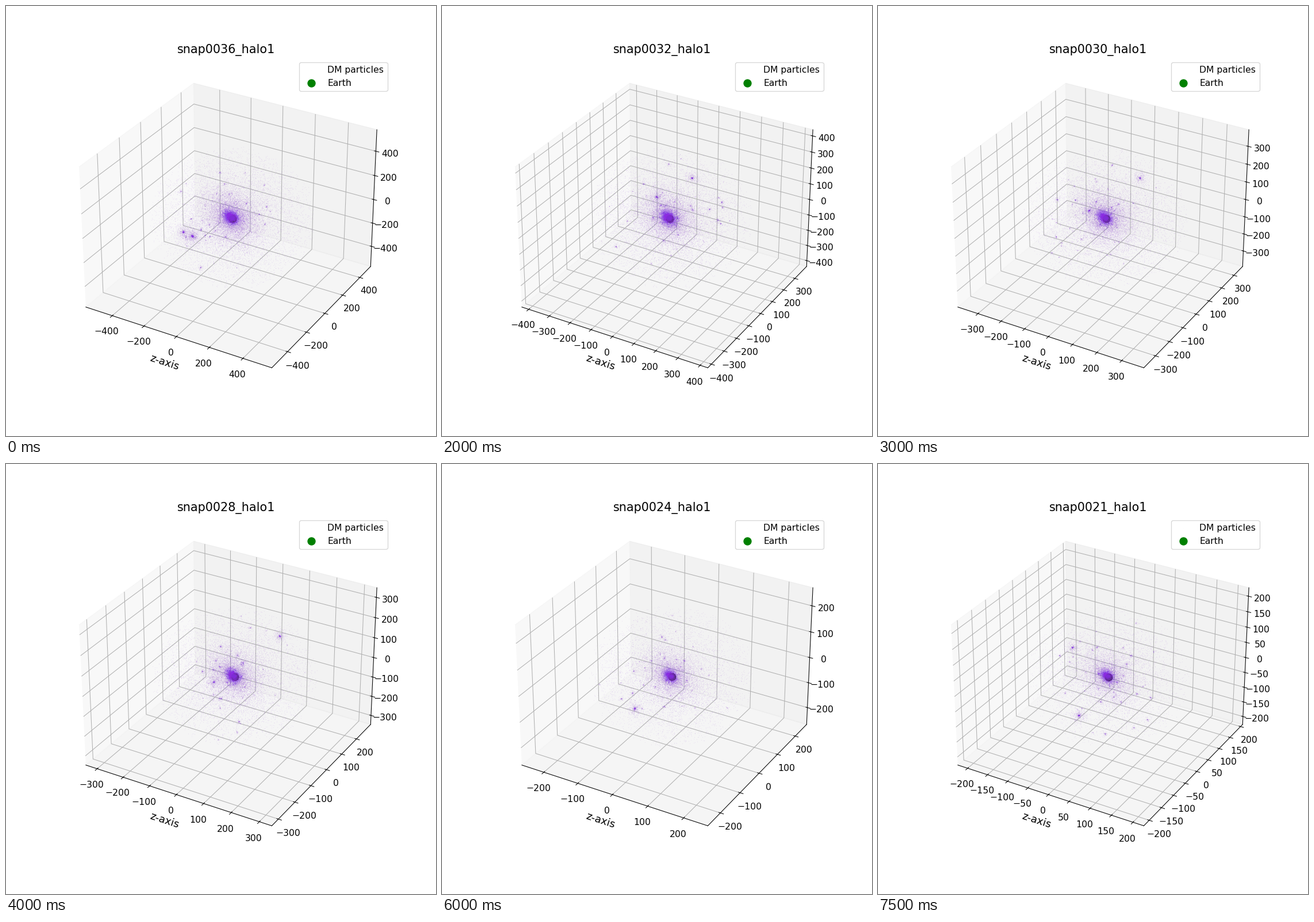
Write a matplotlib script that moves like this. It is 748 by 748 pixels and loops after 8 s.

```python
import numpy as np
import matplotlib.pyplot as plt
from matplotlib.animation import FuncAnimation

SIZE, DPI = 748, 93.5
FRAMES, INTERVAL = 16, 500
FIRST_SNAP = 36
VIOLET = "blueviolet"
OVAL = (1.12, 0.96)

# The box shrinks towards earlier snapshots; its y side ends a bit short.
STEPS = [0, 2, 4, 6, 8, 12, 15]
HALF_WIDTH = [569, 490, 434, 388, 344, 266, 225]
Y_TOP = [0.93, 1.01, 0.938, 0.959, 0.869, 1.0, 0.933]

# Large satellites: first step, last step, start, end, weight.
SATELLITES = [
    (0, 3, (324, 400), (345, 458), 3.0),
    (0, 3, (308, 393), (377, 484), 1.2),
    (1, 8, (404, 299), (476, 299), 0.9),
    (3, 8, (376, 320), (361, 379), 0.8),
    (12, 15, (335, 425), (349, 437), 1.2),
    (13, 15, (330, 315), (338, 319), 0.9),
]


def glide(step, first, last, start, end):
    part = (step - first) / (last - first)
    return np.array(start) + part * np.subtract(end, start)


def earth_at(step):
    return glide(step, 0, FRAMES - 1, (394, 369.5), (401, 370.5))


def ball(rng, n, radius, power, squash=(1, 1)):
    """Points of a centrally dense ball, seen from the side."""
    v = rng.normal(size=(n, 3))
    v /= np.linalg.norm(v, axis=1)[:, None]
    r = radius * rng.random(n) ** power
    return v[:, :2] * r[:, None] * squash


def clump(rng, pos, weight):
    return pos + ball(rng, int(450 * weight), 16 * np.sqrt(weight), 1.6)


def particles(step):
    rng = np.random.default_rng(FIRST_SNAP - step)
    mass = 1 - 0.4 * step / (FRAMES - 1)
    core = earth_at(step) - (4, 2.5)
    tilt = np.array([[1, 0.3], [0.1, 1]])
    parts = [
        core + (4, 1) + ball(rng, int(18000 * mass), 130, 1.35, OVAL),
        core + ball(rng, int(9000 * mass), 60, 1.7) @ tilt,
        core + ball(rng, int(3000 * mass), 15, 0.8) @ tilt,
    ]
    for first, last, start, end, weight in SATELLITES:
        if first <= step <= last:
            pos = glide(step, first, last, start, end)
            parts.append(clump(rng, pos, weight))
    for pos in ball(rng, 40, 120, 0.8, OVAL):
        parts.append(clump(rng, core + pos, 0.03 + 0.16 * rng.random() ** 3))
    return np.vstack(parts)


def set_limits(step):
    half = np.interp(step, STEPS, HALF_WIDTH)
    y_top = half * np.interp(step, STEPS, Y_TOP)
    gap = next(g for g in (50, 100, 200) if 9 * g >= 1.92 * half)
    marks = gap * np.arange(-8, 9)
    sides = [
        (ax.xaxis, ax.set_xlim, -half, half),
        (ax.yaxis, ax.set_ylim, -0.985 * half, y_top),
        (ax.zaxis, ax.set_zlim, -1.01 * half, 1.01 * half),
    ]
    for axis, set_lim, low, high in sides:
        pad = 0.02 * (high - low)
        axis.set_ticks(marks[(marks > low + pad) & (marks < high - pad)])
        set_lim(low, high)


fig = plt.figure(figsize=(SIZE / DPI, SIZE / DPI), dpi=DPI)
ax = fig.add_subplot(111, projection="3d")
ax.tick_params(labelsize=12)
ax.set_xlabel("z-axis", fontsize=14)
title = ax.set_title("", fontsize=16)

# Flat layer in pixel coordinates for the particles.
sky = fig.add_axes([0, 0, 1, 1])
sky.set(xlim=(0, SIZE), ylim=(SIZE, 0))
sky.axis("off")
earth = sky.scatter([0], [0], s=90, color=(0.15, 0.22, 0.16), zorder=2)
dust = sky.scatter([0], [0], s=0.85, color=VIOLET, alpha=0.09,
                   linewidths=0, zorder=3)

keys = [sky.scatter([], [], s=0.1, color=VIOLET, alpha=0.02, linewidths=0),
        sky.scatter([], [], s=100, color="green")]
ax.legend(keys, ["DM particles", "Earth"], loc="upper right", fontsize=12)


def update(step):
    title.set_text(f"snap{FIRST_SNAP - step:04d}_halo1")
    set_limits(step)
    earth.set_offsets([earth_at(step)])
    dust.set_offsets(particles(step))
    return title, earth, dust


anim = FuncAnimation(fig, update, frames=FRAMES, interval=INTERVAL,
                     repeat=True, repeat_delay=0, blit=False)
plt.show()
```
